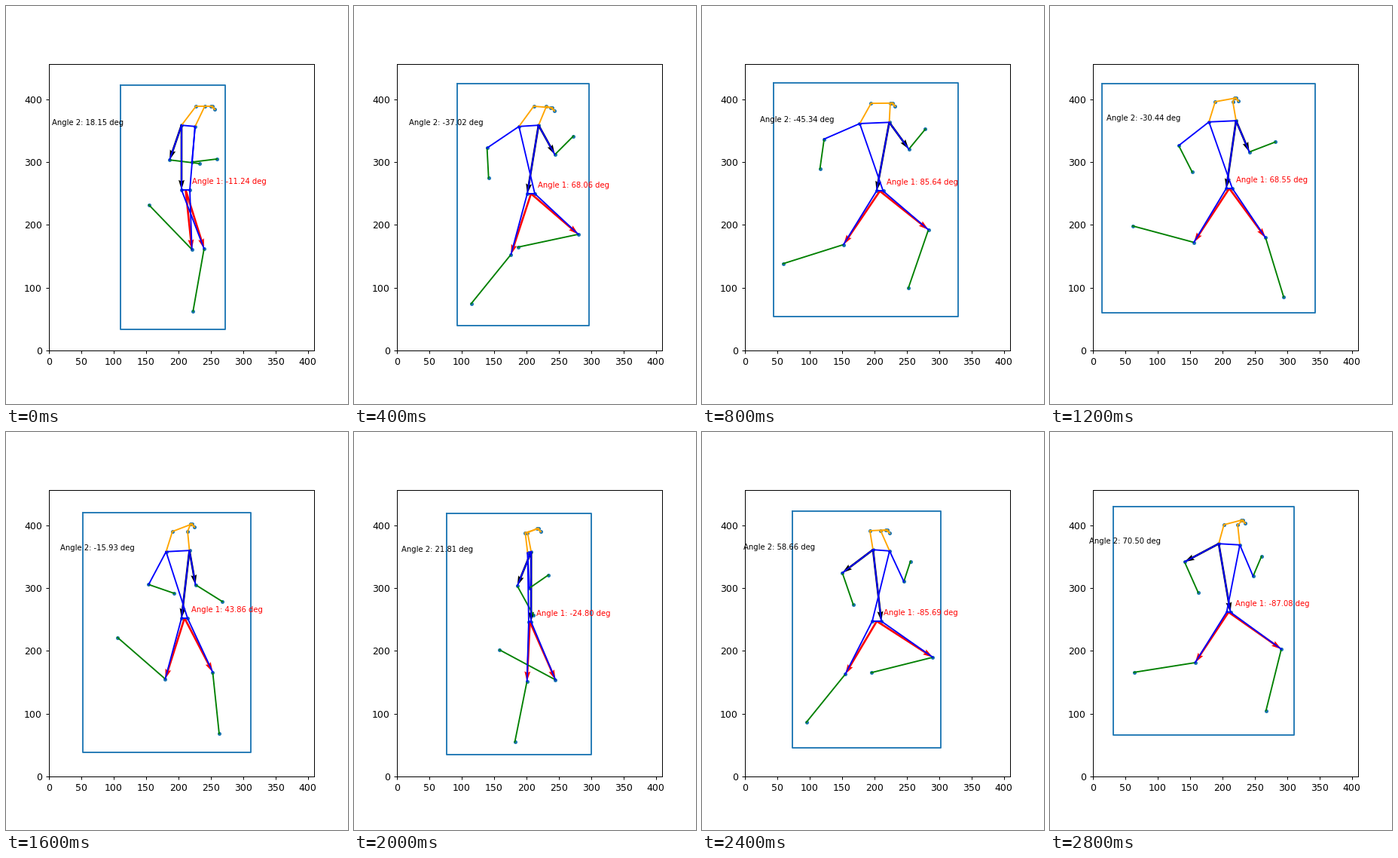
Recreate the animation shown at these times as a matplotlib script. Size 454 px wide and 528 px high, loop 3200 ms.

```python
import numpy as np
import matplotlib.pyplot as plt
from matplotlib.animation import FuncAnimation

W, H, DPI = 454, 528, 90
LEFT, RIGHT, TOP, BOTTOM = 56.75, 408.6, 77, 457
SX, SY = 0.86, 0.8333          # pixels per data unit
STEPS, STEP_MS = 8, 400

fig = plt.figure(figsize=((W + 0.01) / DPI, (H + 0.01) / DPI), dpi=DPI, facecolor="white")
ax = fig.add_axes([LEFT / W, 1 - BOTTOM / H, (RIGHT - LEFT) / W, (BOTTOM - TOP) / H])


def cycle(a, b, d, e, g, h):
    """Six keys spread over a stride of eight steps; a cubic fills both gaps."""
    c = (4 * (b + d) - (a + e)) / 6
    f = (4 * (e + g) - (d + h)) / 6
    return np.array([a, b, c, d, e, f, g, h], float)


def point(x, y):
    return np.column_stack(np.broadcast_arrays(x, y))


def swing(start, angle, length):
    """End of a limb hanging from start; angle in degrees, forward is positive."""
    t = np.radians(angle)
    return start + point(length * np.sin(t), length * np.cos(t))


def upper_arm(angle):
    return 47 - 5 * np.sin(np.radians(angle))


def forearm(angle, reach):
    return reach + 6 * np.cos(np.radians(angle))


def side(name, sign, reach, thigh_len, shank_len, arm, fore, thigh, shank):
    shoulder = chest + sign * point(twist, 0.8)
    elbow = swing(shoulder, arm, upper_arm(arm))
    hip = pelvis + sign * point(hip_twist, 0)
    knee = swing(hip, thigh, thigh_len)
    joints.update({
        "shoulder" + name: shoulder,
        "elbow" + name: elbow,
        "wrist" + name: swing(elbow, fore, forearm(fore, reach)),
        "hip" + name: hip,
        "knee" + name: knee,
        "ankle" + name: swing(knee, shank, shank_len),
        "eye" + name: nose + (-4 + sign, -4),
        "ear" + name: point(nose[:, 0] - 19 + sign * 0.65 * twist, chest[:, 1] - 26),
    })


# Body in stage pixels
chest = point(cycle(242, 232, 229, 228, 238, 238), cycle(159, 159, 153, 158, 157, 149))
pelvis = point(cycle(238.5, 235, 238, 237, 232, 237), cycle(244, 249, 242, 247, 251, 239))
nose = point(cycle(277, 266, 250, 250, 249, 259), cycle(137, 139, 126, 126, 134, 121))
twist = cycle(9, -13, -18, -15.5, 11, 14)
hip_twist = cycle(5.5, 5, 4, 4, -6, -2.5)

joints = {"nose": nose}
side("A", -1, 39, 83.5, 84,
     arm=cycle(-19, 29, 23, 10, -53, -62),
     fore=cycle(83, 135, 111, 58, 19, 24),
     thigh=cycle(21, -15, -31, -15, 55, 54),
     shank=cycle(-10, -39, -105, -131, -76, -14))
side("B", 1, 34, 79, 82,
     arm=cycle(-5, -56, -52, -28, 25, 23),
     fore=cycle(97, 3, 27, 71, 162, 157),
     thigh=cycle(2, 47, 34, 25, -27, -32),
     shank=cycle(-136, -78, 17, 6, -39, -81))

box_x = cycle(152, 137, 69, 102, 120, 84), cycle(291, 312, 352, 325, 317, 324)
box_y = cycle(105, 103, 103, 107, 105, 99), cycle(429, 424, 407, 425, 419, 402)
legs_angle = cycle(-11.24, 68.06, 68.55, 43.86, -85.69, -87.08)
arm_angle = cycle(18.15, -37.02, -30.44, -15.93, 58.66, 70.50)

BONES = [("shoulderA", "shoulderB", "blue"), ("hipA", "hipB", "blue"), ("eyeA", "eyeB", "orange")]
for s in "AB":
    for a, b, color in [("shoulder", "ear", "orange"), ("ear", "eye", "orange"),
                        ("elbow", "wrist", "green"), ("knee", "ankle", "green"),
                        ("shoulder", "elbow", "blue"), ("shoulder", "hip", "blue"),
                        ("hip", "knee", "blue")]:
        BONES.append((a + s, b + s, color))
    BONES.append(("eye" + s, "nose", "orange"))


def to_data(p):
    return (np.asarray(p) - (LEFT, BOTTOM)) / (SX, -SY)


def arrows(start, ends, color):
    d = np.array(ends) - start
    ax.quiver([start[0]] * 2, [start[1]] * 2, d[:, 0], d[:, 1], color=color,
              angles="xy", scale_units="xy", scale=1, width=0.0075)


def label(pos, number, angle, color):
    ax.text(*pos, f"Angle {number}: {angle:.2f} deg", color=color, fontsize=8)


def draw(i):
    p = {name: to_data(track[i]) for name, track in joints.items()}
    ax.cla()
    ax.set(xlim=(0, (RIGHT - LEFT) / SX), ylim=(0, (BOTTOM - TOP) / SY),
           xticks=range(0, 401, 50), yticks=range(0, 401, 100))

    ax.scatter(*np.array(list(p.values())).T, s=9, color="C0")
    (x0, x1), (y0, y1) = [(lo[i], hi[i]) for lo, hi in (box_x, box_y)]
    ax.plot(*to_data([(x0, y0), (x1, y0), (x1, y1), (x0, y1), (x0, y0)]).T, color="C0")

    mid = (p["hipA"] + p["hipB"]) / 2
    arrows(mid, [p["kneeA"], p["kneeB"]], "red")
    arrows(p["shoulderA"], [p["elbowA"], p["hipA"]], "black")
    for a, b, color in BONES:
        ax.plot(*np.array([p[a], p[b]]).T, color=color)

    label(mid + 10, 1, legs_angle[i], "red")
    label(p["shoulderA"] - (200, 0), 2, arm_angle[i], "black")
    return []


anim = FuncAnimation(fig, draw, frames=STEPS, interval=STEP_MS,
                     init_func=lambda: draw(0), repeat=True, repeat_delay=0)
plt.show()
```
